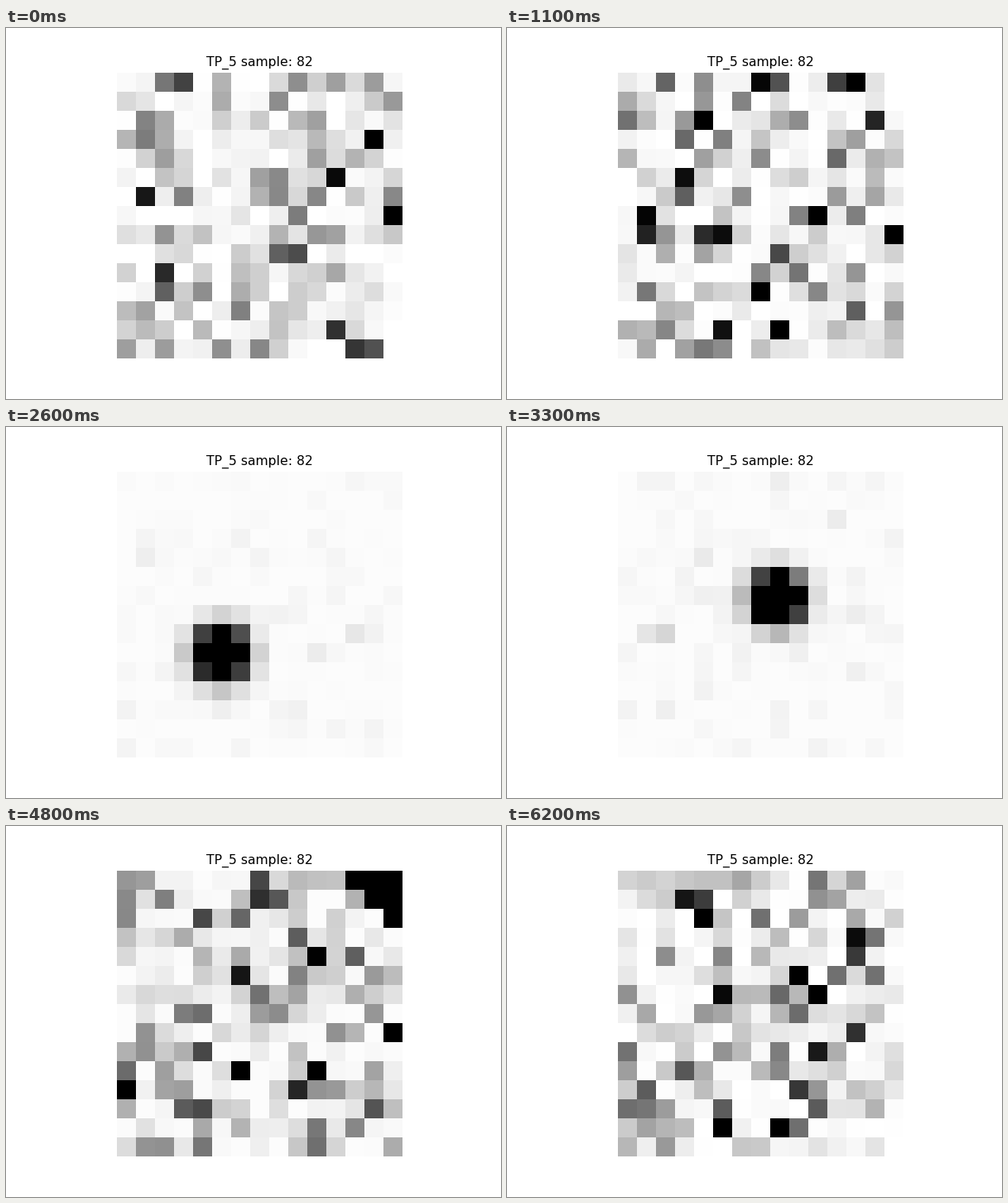
Animation of 598x448 px, one loop 6300 ms. Source, as a matplotlib script:

```python
import numpy as np
import matplotlib.pyplot as plt
from matplotlib.animation import FuncAnimation

N = 15                      # grid cells per side
FRAMES, INTERVAL = 63, 100
HOLDS = (32, 37, 47)        # frames that repeat the previous sample
FIRST, LAST = 15, 45        # samples in which the spot is present
DPI = 64

rows, cols = np.mgrid[:N, :N]


def noise(sample):
    """Strong noise outside the sweep, fading to faint noise during it."""
    if FIRST <= sample < LAST:
        gain = (0.011 + 0.09 * np.exp(-0.8 * (sample - FIRST))
                + 0.12 * np.exp(-2 * (LAST - 1 - sample)))
    else:
        gain = 0.19
    rng = np.random.default_rng(1000 + sample)
    return gain * rng.standard_normal((N, N)) ** 2


def spot(sample):
    """Saturated bump sweeping from the bottom left to the top right corner."""
    if not FIRST <= sample <= LAST:
        return np.zeros((N, N))
    x = np.clip((sample - 15.72) * (N - 1) / 29, 0, N - 1)
    r2 = (cols - x) ** 2 + (rows - (N - 1 - x)) ** 2
    if sample == LAST:
        return (r2 <= 4).astype(float)
    settle = np.clip((sample - 19) / 6, 0, 1)
    height = 4.67 - 1.57 * settle
    falloff = 0.65 + 0.07 * settle
    return height * np.exp(-falloff * r2)


def darkness(frame):
    sample = frame - sum(frame >= hold for hold in HOLDS)
    floor = 0.012 if 20 <= sample < 56 else 0
    return np.clip(floor + noise(sample) + spot(sample), 0, 1)


fig, ax = plt.subplots(figsize=(598 / DPI, 448 / DPI), dpi=DPI, facecolor="white")
fig.subplots_adjust(left=0.125, right=0.9, bottom=0.11, top=0.88)
image = ax.imshow(darkness(0), cmap="gray_r", vmin=0, vmax=1, interpolation="nearest")
ax.set_title("TP_5 sample: 82", fontname="DejaVu Sans", fontsize=17.6, pad=8.75)
ax.axis("off")


def update(frame):
    image.set_data(darkness(frame))
    return (image,)


anim = FuncAnimation(fig, update, frames=FRAMES, interval=INTERVAL,
                     repeat=True, repeat_delay=0)
plt.show()
```
